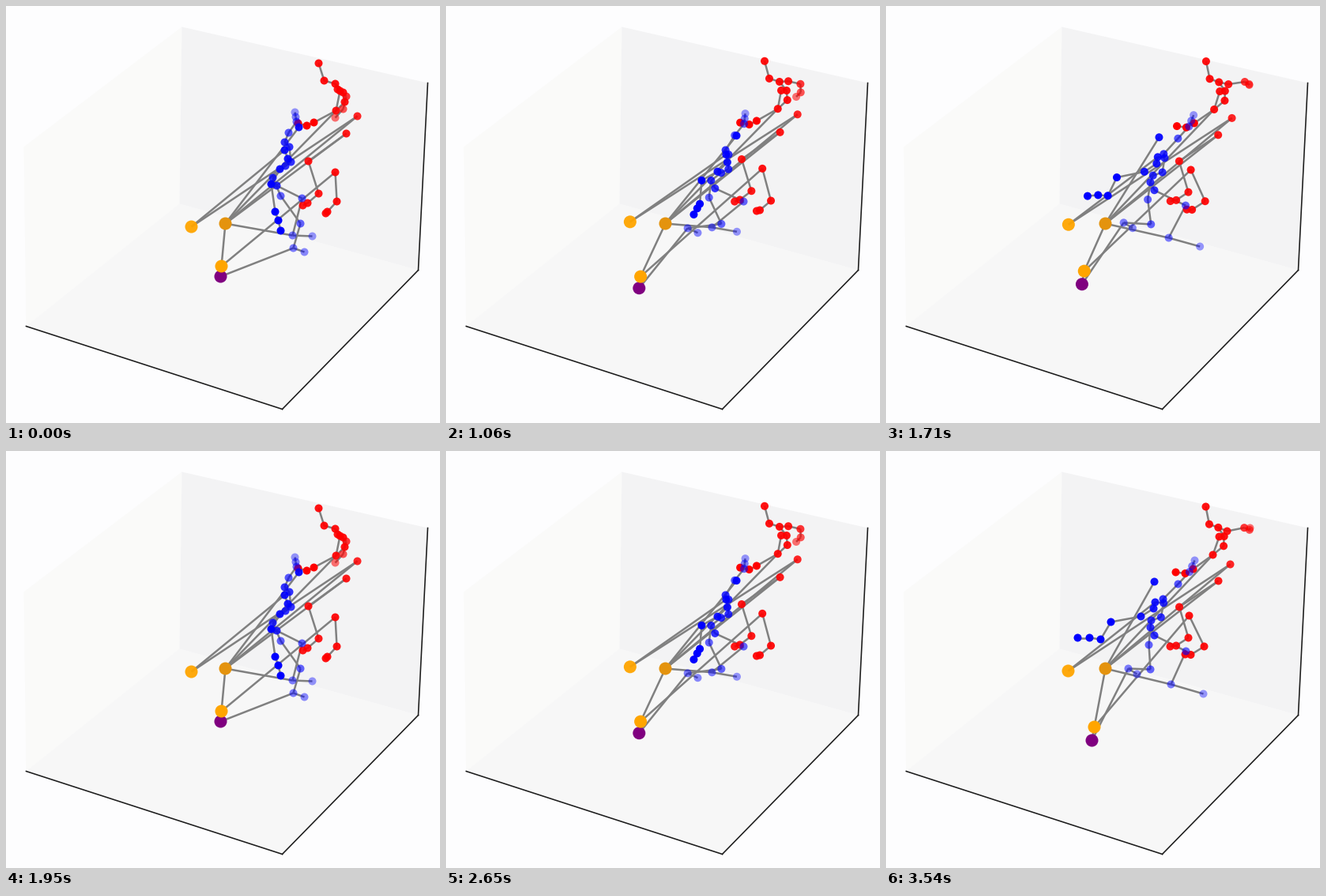
Write a matplotlib script that moves like this. It is 549x528 px and loops after 3630 ms.

```python
import numpy as np
import matplotlib.pyplot as plt
from matplotlib.animation import FuncAnimation
from matplotlib.collections import LineCollection
from matplotlib.colors import to_rgba
from matplotlib.patches import Polygon

W, H = 549, 528
LOOP, TICK = 3630, 10

# The gesture plays twice, in equal steps, after a short rest.
REST, STEP, COUNT = 340, 100, 16

STILL = (0, 0)
chains, colors, sizes, edges = [], [], [], []
first = {}


def chain(name, color, alpha, start, head, tail=None, bow=STILL,
          sway=STILL, skew=1, size=10):
    """Add linked joints whose travel blends from head to tail.

    bow bends the path aside and back, sway swings it both ways,
    skew below 1 makes the bend peak earlier.
    """
    start = np.array(start, float)
    count = len(start)
    travel = np.linspace(head, tail or head, count)
    index = len(colors)
    first[name] = index
    chains.append((start, travel, np.array(bow), np.array(sway), skew))
    shades = [color] * count if isinstance(color, str) else color
    colors.extend(map(to_rgba, shades, np.broadcast_to(alpha, count)))
    sizes.extend([size ** 2] * count)
    edges.extend((index + i, index + i + 1) for i in range(count - 1))


def link(a, i, b, j):
    edges.append((first[a] + i, first[b] + j))


# Red joints
chain("crown", "red", 0.93,
      [(395, 72), (402, 94), (416, 98), (426, 109), (428, 121), (417, 132)],
      head=(9, -2), tail=(-4, -1), bow=(4, -2))
chain("wing", "red", np.linspace(0.9, 0.55, 4),
      [(419, 105), (430, 114), (426, 130), (416, 141)],
      head=(12, -4), tail=(44, -44), bow=(9, -9))
chain("knot", "red", 0.93, [(422, 107)], head=(-1, 1), bow=(2, -1))
chain("branch", "red", 1, [(389, 147), (380, 151), (369, 148)],
      head=(-1, 2), tail=(-3, 5), bow=(4, -3))
chain("tip", "red", 0.85, [(444, 139)], head=(-9, 4), bow=(4, -4))
chain("inner", "red", 0.9,
      [(430, 161), (382, 196), (395, 237), (381, 249), (375, 252)],
      head=(-10, 3), tail=(-16, -5), bow=(-4, -3))
chain("elbow", "red", 0.93, [(416, 210)], head=(-33, -2), bow=(-3, -4))
chain("outer", "red", 0.93, [(418, 247), (406, 260), (404, 262)],
      head=(-16, 0), tail=(-26, -5), bow=(-1, -1))

# Blue joints
chain("neck", "blue", np.linspace(0.4, 0.65, 4),
      [(365, 134), (366, 140), (367, 146), (357, 160)],
      head=(25, 4), tail=(12, 8), bow=(3, 0))
chain("spine", "blue", 0.8,
      [(352, 172), (358, 178), (360, 197), (353, 202)],
      head=(-2, 15), tail=(-18, 12), bow=(2, 4))
chain("hub", "blue", 0.8, [(337, 217), (342, 227)],
      head=(-3, 6), bow=(-1, 1))
chain("peak", "blue", 0.93, [(370, 153)], head=(-31, 12), bow=(10, 6))
chain("side", "blue", 0.9, [(352, 182), (356, 193), (346, 206)],
      head=(-12, 9), tail=(-24, 3), bow=(7, 2))
chain("arm", "blue", 1, [(335, 225), (340, 260), (344, 271), (347, 284)],
      head=(-51, -9), tail=(-105, -48), bow=(9, -1))
chain("knee", "blue", 0.6, [(374, 243)], head=(5, 10))
chain("leg", "blue", [0.5, 0.4], [(362, 290), (387, 291)],
      head=(-2, 5), tail=(14, 16), bow=(-33, -16), skew=0.5)
chain("shin", "blue", 0.6, [(347, 240), (372, 275)],
      head=(-15, 5), tail=(-38, 1), bow=(-9, 0))
chain("foot", "blue", [0.5, 0.45], [(363, 306), (377, 311)],
      head=(-57, -31), tail=(-60, -29), bow=(-36, -13))

# Large anchors
chain("base", ["purple", "orange"], 1, [(271, 342), (272, 329)],
      head=(-11, 24), tail=(-9, 20), bow=(-26, 0), sway=(6, 13), size=16)
chain("anchor", "orange", 0.95, [(234, 279)], head=(-4, -1),
      bow=(0, -6), size=16)
chain("pivot", "#e4930e", 1, [(277, 275)], head=STILL, size=16)

for joint in [
    ("crown", 2, "wing", 0), ("knot", 0, "crown", 5),
    ("crown", 5, "branch", 0), ("elbow", 0, "outer", 0),
    ("anchor", 0, "side", 0), ("anchor", 0, "tip", 0),
    ("pivot", 0, "crown", 5), ("pivot", 0, "tip", 0),
    ("pivot", 0, "inner", 0), ("pivot", 0, "peak", 0),
    ("pivot", 0, "base", 1), ("pivot", 0, "leg", 0),
    ("base", 1, "elbow", 0), ("base", 0, "foot", 0),
    ("neck", 3, "spine", 0), ("spine", 3, "hub", 0),
    ("spine", 1, "side", 0), ("side", 2, "arm", 0),
    ("hub", 0, "shin", 0), ("hub", 1, "knee", 0),
    ("knee", 0, "leg", 0), ("shin", 1, "foot", 0),
]:
    link(*joint)
edges = np.array(edges)


def phase_at(t):
    period = STEP * COUNT
    elapsed = t - REST if t < REST + period else t - REST - period
    return np.clip(elapsed // STEP, 0, COUNT) / COUNT


def pose(p):
    ease = p * p * (3 - 2 * p)
    swing = np.sin(2 * np.pi * p)
    return np.concatenate([
        start + travel * ease + sway * swing
        + bow * np.sin(np.pi * p ** skew) ** 2
        for start, travel, bow, sway, skew in chains
    ])


fig = plt.figure(figsize=(W / 72, H / 72), dpi=72, facecolor="#fdfdfe")
ax = fig.add_axes([0, 0, 1, 1])
ax.set_xlim(-0.5, W - 0.5)
ax.set_ylim(H - 0.5, -0.5)
ax.axis("off")

# Box: two walls, the floor and three visible axis lines
left, front, right, back = (25, 405), (349, 510), (521, 334), (219, 250)
left_top, right_top, back_top = (22, 178), (533, 97), (222, 26)
for corners, shade in [
    ((left, left_top, back_top, back), "#fafaf9"),
    ((back, back_top, right_top, right), "#f3f3f4"),
    ((left, front, right, back), "#f7f7f7"),
]:
    ax.add_patch(Polygon(corners, facecolor=shade, edgecolor="none"))
for a, b in [(left, front), (front, right), (right, right_top)]:
    ax.plot(*zip(a, b), color="#1c1c1c", lw=1.6)

bones = LineCollection([], colors="gray", linewidths=2.5, zorder=3)
ax.add_collection(bones)
joints = ax.scatter(*pose(0).T, s=sizes, c=colors, linewidths=0, zorder=4)


def draw(frame):
    xy = pose(phase_at(frame * TICK))
    bones.set_segments(xy[edges])
    joints.set_offsets(xy)
    return bones, joints


anim = FuncAnimation(fig, draw, frames=LOOP // TICK, interval=TICK,
                     repeat=True, repeat_delay=0)
plt.show()
```
